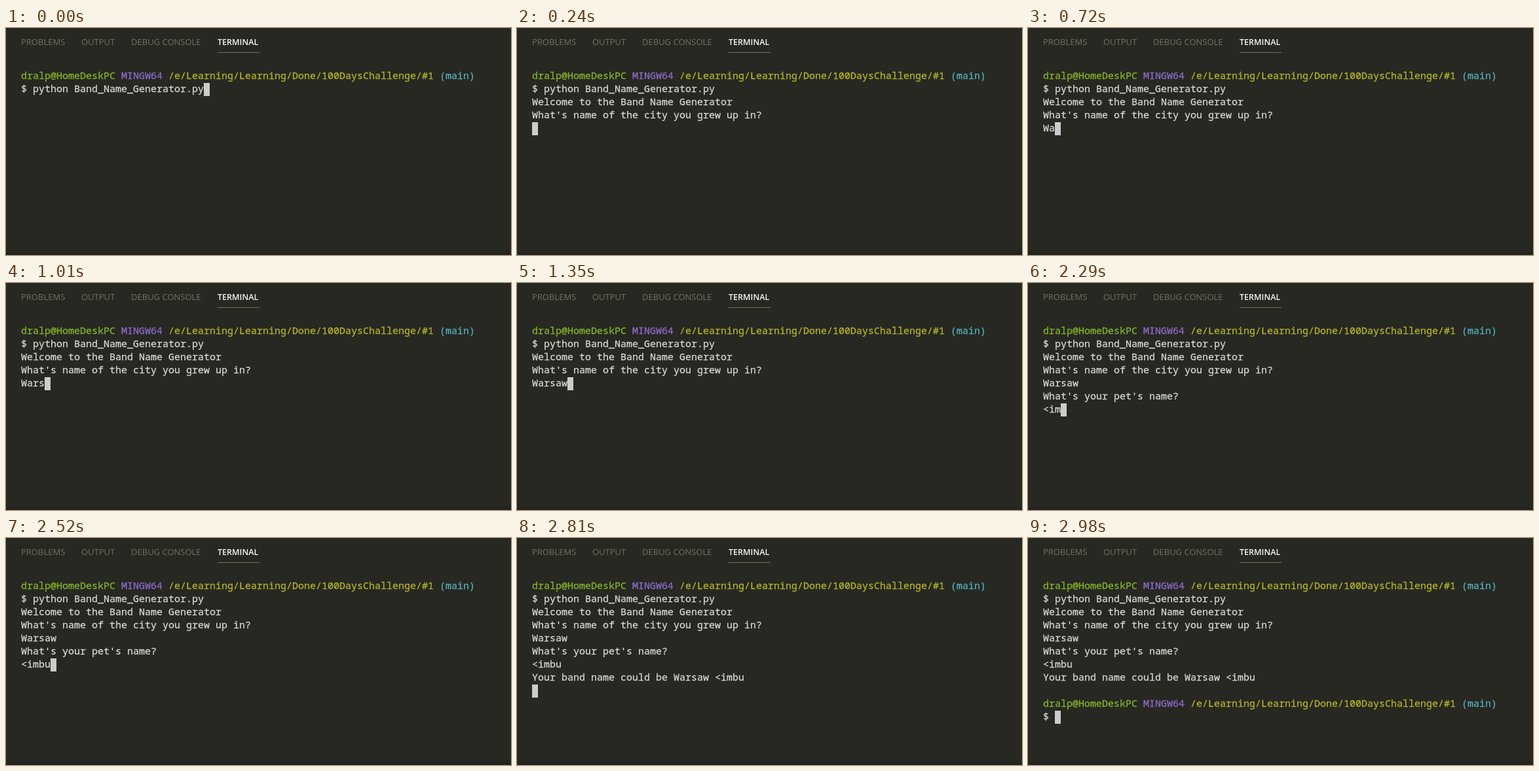
An HTML page with a canvas for the animation above (3210 ms loop, 771 by 347 pixels).

```html
<!DOCTYPE html>
<html lang="en">
<head>
<meta charset="utf-8">
<title>Band name generator</title>
<style>
  html, body { margin: 0; width: 100%; height: 100%; overflow: hidden; background: #272822; }
  canvas { display: block; }
</style>
</head>
<body>
<canvas id="stage" width="771" height="347"></canvas>
<script>
const ctx = document.getElementById('stage').getContext('2d');

const LOOP = 3210;
const LEFT = 23, TOP = 64, CELL = 9, ROW = 20, BASELINE = 14;
const MONO = '15px "Noto Sans Mono", monospace';
const TAB_FONT = '13px "Open Sans", "Noto Sans", sans-serif';
const ACTIVE_TAB_FONT = '600 12.5px "Open Sans", "Noto Sans", sans-serif';
const COLOR = {
  back: '#272822', edge: '#242321', text: '#d6d6d2', cursor: '#cccccc',
  green: '#86b42b', violet: '#8c6bc8', yellow: '#b3b42b', cyan: '#56adbc',
  tab: '#75715e', activeTab: '#f8f8f2'
};

const TABS = [['PROBLEMS', 23], ['OUTPUT', 115], ['DEBUG CONSOLE', 191], ['TERMINAL', 323]];
const PROMPT = [
  ['dralp@HomeDeskPC ', COLOR.green],
  ['MINGW64 ', COLOR.violet],
  ['/e/Learning/Learning/Done/100DaysChallenge/#1 ', COLOR.yellow],
  ['(main)', COLOR.cyan]
];

const CITY = 'Warsaw', PET = '<imbu';
const CITY_KEYS = [470, 720, 870, 1010, 1180, 1350];
const PET_KEYS = [1970, 2050, 2290, 2370, 2520];

const typed = (word, keys, t) => word.slice(0, keys.filter(k => k <= t).length);

// Every terminal row on screen at time t; the cursor follows the last one.
function rowsAt(t) {
  const rows = [PROMPT, '$ python Band_Name_Generator.py'];
  if (t >= 240) {
    rows.push('Welcome to the Band Name Generator',
      "What's name of the city you grew up in?", typed(CITY, CITY_KEYS, t));
  } else if (t >= 150) {
    rows.push('');
  }
  if (t >= 1580) rows.push("What's your pet's name?", typed(PET, PET_KEYS, t));
  if (t >= 2810) rows.push(`Your band name could be ${CITY} ${PET}`, '');
  if (t >= 2980) rows.push(PROMPT, '$ ');
  return rows;
}

function drawTabs() {
  for (const [label, x] of TABS) {
    const active = label === 'TERMINAL';
    ctx.font = active ? ACTIVE_TAB_FONT : TAB_FONT;
    ctx.fillStyle = active ? COLOR.activeTab : COLOR.tab;
    ctx.fillText(label, x, 26);
  }
  ctx.fillStyle = COLOR.tab;
  ctx.fillRect(323, 37, 64, 1);
}

// A hairline outline gives the monospace text a slightly heavier weight.
function drawRow(row, index) {
  const parts = typeof row === 'string' ? [[row, COLOR.text]] : row;
  const y = TOP + index * ROW + BASELINE;
  let x = LEFT;
  for (const [text, color] of parts) {
    ctx.fillStyle = ctx.strokeStyle = color;
    ctx.fillText(text, x, y);
    ctx.strokeText(text, x, y);
    x += text.length * CELL;
  }
}

function draw(t) {
  ctx.fillStyle = COLOR.back;
  ctx.fillRect(0, 0, 771, 347);
  ctx.fillStyle = COLOR.edge;
  ctx.fillRect(0, 342, 771, 5);
  drawTabs();

  const rows = rowsAt(t);
  const last = rows.length - 1;
  ctx.font = MONO;
  ctx.lineWidth = 0.3;
  ctx.lineJoin = 'round';
  rows.forEach(drawRow);
  ctx.fillStyle = COLOR.cursor;
  ctx.fillRect(LEFT + rows[last].length * CELL, TOP + last * ROW, CELL, ROW);
}

const start = performance.now();
function tick() {
  draw((performance.now() - start) % LOOP);
  requestAnimationFrame(tick);
}
tick();
</script>
</body>
</html>
```
